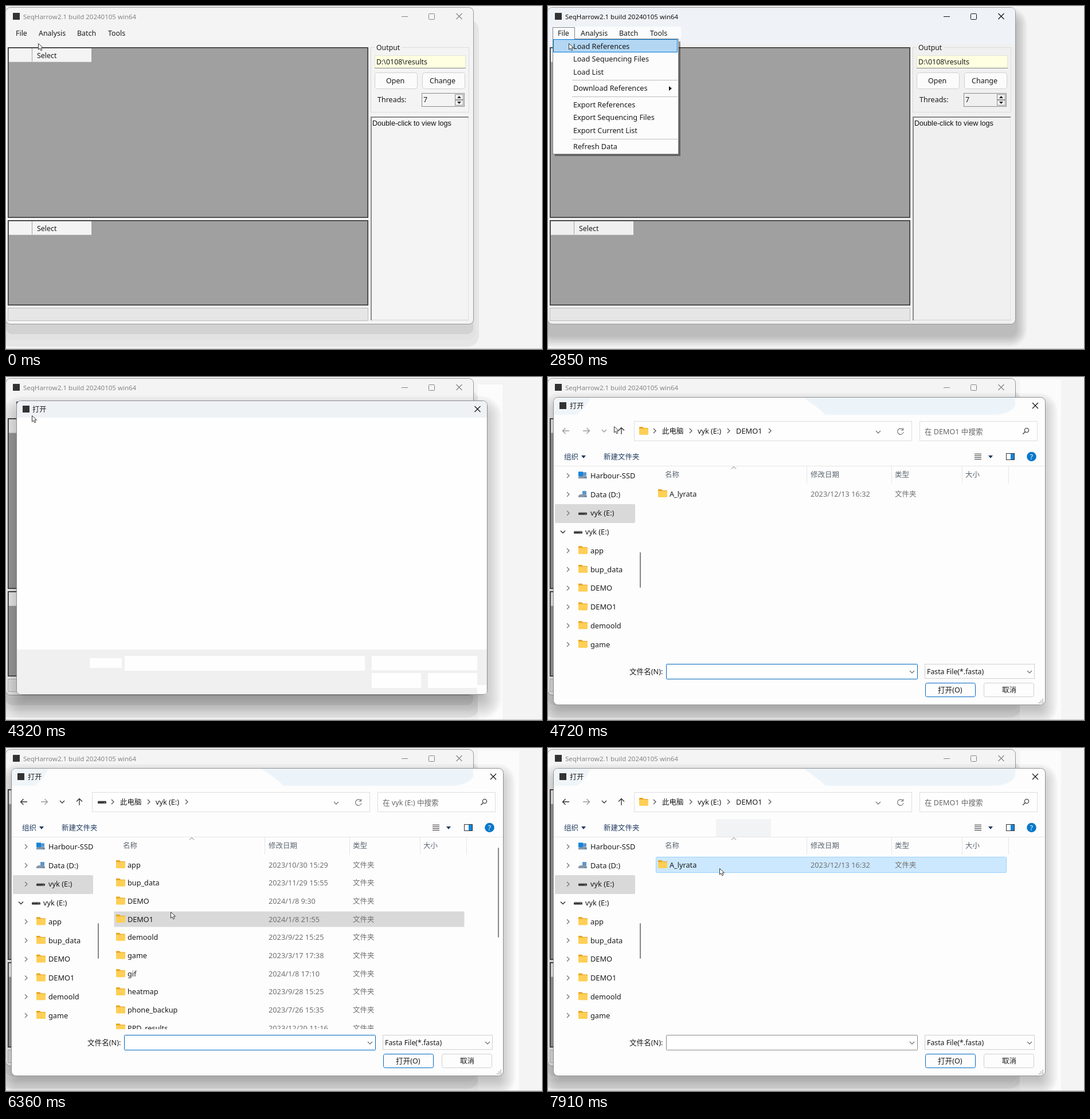
Write an HTML page that moves like this. It is 935x599 px and loops after 8 s.

```html
<!DOCTYPE html>
<html lang="zh">
<head>
<meta charset="utf-8">
<style>
  html, body { margin: 0; width: 100%; height: 100%; overflow: hidden; background: #f4f4f4; }
  svg { display: block; width: 935px; height: 599px; }
  text { font-family: "Noto Sans", "Noto Sans CJK SC", "Noto Sans CJK", sans-serif; white-space: pre; }
  .log { font-family: "Liberation Sans", Arial, sans-serif; }
</style>
</head>
<body>
<svg id="stage" viewBox="0 0 935 599">
  <defs>
    <clipPath id="listClip"><rect x="180" y="156" width="690" height="335"/></clipPath>
    <clipPath id="sideClip"><rect x="10" y="156" width="142" height="334"/></clipPath>
  </defs>
  <g id="scene"></g>
</svg>
<script>
const LOOP = 8000;
const APP = "SeqHarrow2.1 build 20240105 win64";
const DRIVE = "vyk (E:)";
const INK = "#1a1a1a", BLUE = "#0067c0";

// Drawing helpers; strokes sit on half pixels.
const rect = (x, y, w, h, fill, stroke, r = 0) => {
  const o = stroke ? 0.5 : 0;
  return `<rect x="${x + o}" y="${y + o}" width="${w - 2 * o}" height="${h - 2 * o}" rx="${r}" fill="${fill}"` +
    (stroke ? ` stroke="${stroke}"` : "") + "/>";
};
const path = (d, stroke, width = 1, fill = "none") =>
  `<path d="${d}" fill="${fill}" stroke="${stroke}" stroke-width="${width}"/>`;
const shape = (d, fill) => path(d, "none", 0, fill);
const text = (x, mid, s, size = 12.7, fill = INK, cls = "") =>
  `<text x="${x}" y="${mid + 4.5}" font-size="${size}" fill="${fill}" class="${cls}">${s}</text>`;
const hline = (x1, x2, y, c) => rect(x1, y, x2 - x1, 1, c);
const vline = (x, y1, y2, c) => rect(x, y1, 1, y2 - y1, c);
const CHEVRON = { r: "-2,-4l4,4l-4,4", d: "-4,-2l4,4l4,-4", u: "-4,2l4,-4l4,4" };
const chevron = (x, y, dir, c = "#555", w = 1.3) =>
  `<g transform="translate(${x} ${y})">${path("M" + CHEVRON[dir], c, w)}</g>`;
const cross = (x, y, c) => path(`M${x - 5},${y - 5}l10,10m0,-10l-10,10`, c, 1.2);

// Shadows are stacked flat bands: [spread, drop, opacity].
const shadow = (x, y, w, h, bands) => bands.map(([s, dy, a]) =>
  `<rect x="${x - s}" y="${y - s + dy}" width="${w + 2 * s}" height="${h + 2 * s}" rx="${Math.max(8, s + 10)}" opacity="${a}"/>`).join("");
const bands = (n, min, max, dy, a) =>
  Array.from({ length: n }, (_, i) => [min + (max - min) * i / (n - 1), dy, a]);

const folder = (x, y) =>
  shape(`M${x},${y - 6}q0,-1 1,-1h5l2,2h7q1,0 1,1v8h-16z`, "#e9a422") +
  rect(x, y - 4, 16, 11, "#ffcf56", null, 1.5);
const disk = (x, y) =>
  rect(x, y - 1, 15, 4, "#3c3c3c", null, 1) + rect(x + 1, y - 2, 13, 1, "#b0b0b0") + rect(x + 11, y + 1, 2, 1, "#4fd06a");
const dataDisk = (x, y) =>
  shape(`M${x},${y + 2}l3,-2h10l2,2v3h-15z`, "#8798a8") + rect(x + 7, y - 6, 7, 6, "#5d97cc") + rect(x + 11, y + 3, 2, 1, "#2b6cb0");
const cursor = ([x, y]) =>
  path(`M${x + .5},${y + .5}v10.6l2.5,-2.3l1.8,4l2,-.9l-1.8,-3.9h3.5z`, "#333", 1, "#fff");

function mainWindow(s) {
  const on = s.active, face = on ? "#f0f0f0" : "#f4f4f4", ink = on ? "#111" : "#858585";
  const soft = [[10, 30, .06], [4, 24, .02], [0, 18, .07]];
  let g = shadow(0, 3, 815, 552, s.deep ? bands(6, 3, 20, 20, .042) : soft);
  g += rect(-1, 2, 817, 554, face, "#969696", 8);
  if (on) g += shape("M0,66V11q0,-8 8,-8h799q8,0 8,8v55z", "#eff3f8");
  g += rect(12, 12, 12, 12, "#333") + text(30, 18, APP, 11.5, ink);
  g += hline(690, 701, 18, ink) + rect(737, 13, 11, 11, "none", ink, 1) + cross(790.5, 18, ink);

  if (s.menu) g += rect(8, 36, 224, 22, "#fbfcfd");
  if (s.hot === "File") g += rect(8, 37, 39, 21, "#b3d7f3", "#0078d7");
  if (s.hot === "Analysis") g += rect(47, 37, 66, 21, "#b3d7f3", "#0078d7");

  // two tables, then the progress strip
  for (const [y, h] of [[72, 298], [374, 149]]) {
    g += rect(3, y, 629, h, "#a0a0a0", "#2d2d2d") + rect(4, y + 1, 627, h - 2, "none", "#686868");
    g += rect(5, y + 2, 144, 24, face) + vline(45, y + 2, y + 26, "#a0a0a0") + hline(5, 149, y + 25, "#d8d8d8");
    g += text(54, y + 14, "Select", 12.4);
  }
  g += rect(3, 527, 629, 23, "#e6e6e6", "#bcbcbc");

  g += rect(636, 72, 172, 114, "none", "#dcdcdc") + rect(643, 68, 47, 10, face) + text(646, 72, "Output", 12.3);
  g += rect(643, 86, 159, 23, "#ffffe1", "#e2e2d8") + hline(643, 802, 108, "#868686") + text(646, 97.5, "D:\\0108\\results", 12.4);
  g += rect(643, 116, 75, 29, "#fbfbfb", "#d0d0d0", 4) + text(663, 130.5, "Open", 12.5);
  g += rect(726, 116, 75, 29, "#fbfbfb", "#d0d0d0", 4) + text(739, 130.5, "Change", 12.5);
  g += text(648, 163, "Threads:", 12.5) + rect(725, 152, 75, 24, face, "#8a8a8a") + text(728, 163, "7", 12.4);
  g += rect(783, 154, 15, 10, "#f0f0f0", "#8d8d8d") + rect(783, 164, 15, 10, "#f0f0f0", "#8d8d8d");
  g += shape("M787,161h7l-3.5,-4z", "#222") + shape("M787,167h7l-3.5,4z", "#222");

  g += rect(636, 193, 171, 356, face, "#e2e2e2") + rect(636, 193, 171, 2, "#8a8a8a") + rect(636, 193, 2, 356, "#8a8a8a");
  g += hline(638, 807, 548, "#d0d0d0") + text(639, 204, "Double-click to view logs", 12.6, "#111", "log");
  if (s.menu) g += fileMenu(s.pick);
  [["File", 17], ["Analysis", 57], ["Batch", 124], ["Tools", 178]].forEach(([w, x]) => g += text(x, 47, w, 12.4));
  return g;
}

function fileMenu(pick) {
  let g = `<rect x="12" y="62" width="219" height="200" opacity=".38"/>`;
  g += rect(8, 57, 220, 202, "#fcfcfc", "#858585") + rect(8, 37, 39, 21, "#fafbfc", "#858585") + rect(9, 56, 37, 3, "#fbfbfc");
  if (pick) g += rect(9, 58, 217, 23, "#b3d7f3", "#0078d7");
  [["Load References", 70], ["Load Sequencing Files", 92.5], ["Load List", 115], ["Download References", 143.5],
   ["Export References", 172], ["Export Sequencing Files", 194.5], ["Export Current List", 217], ["Refresh Data", 245.5]]
    .forEach(([w, y]) => g += text(44, y, w));
  for (const y of [129, 158, 232]) g += hline(42, 226, y, "#bdbdbd");
  return g + shape("M211,140v8l5,-4z", "#111");
}

function blankDialog() {
  let g = rect(823, 13, 43, 586, "#fcfcfc") + shadow(19, 42, 820, 512, bands(14, -14, 26, 17, .022));
  g += rect(18, 41, 822, 514, "#fefefe", "#8c8c8c", 8);
  g += shape("M19,71V50q0,-8 8,-8h804q8,0 8,8v21z", "#eff2f5");
  g += shape("M19,476H839v70q0,8 -8,8H27q-8,0 -8,-8z", "#f0f0f0");
  g += rect(29, 50, 12, 12, "#333") + text(46, 56.5, "打开", 12.2) + cross(822.5, 56, "#111");
  for (const [x, y, w, h] of [[146, 491, 56, 17], [207, 487, 419, 26], [638, 487, 184, 25],
    [638, 517, 86, 26], [736, 517, 86, 26], [822, 538, 16, 15]]) g += rect(x, y, w, h, "#fefefe");
  return g;
}

const FOLDERS = [["app", "2023/10/30 15:29"], ["bup_data", "2023/11/29 15:55"], ["DEMO", "2024/1/8 9:30"],
  ["DEMO1", "2024/1/8 21:55"], ["demoold", "2023/9/22 15:25"], ["game", "2023/3/17 17:38"], ["gif", "2024/1/8 17:10"],
  ["heatmap", "2023/9/28 15:25"], ["phone_backup", "2023/7/26 15:35"], ["PPD_results", "2023/12/20 11:16"]];
const INNER = [["A_lyrata", "2023/12/13 16:32"]];
const TONES = { gray: ["#d9d9d9"], hover: ["#e5f3ff"], chosen: ["#cce8ff", "#99d1ff"] };

function fileList(s) {
  if (s.list === "none") return "";
  if (s.list === "busy") return text(491, 208, "正在处理...", 12.5, "#6d6d6d");
  let g = "";
  (s.list === "root" ? FOLDERS : INNER).forEach(([name, date], i) => {
    const y = 204 + i * 31.7, tone = s.rows[name];
    if (tone) g += rect(188, Math.round(y) - 14, 612, 28, ...TONES[tone], 1);
    g += folder(192, y - 1) + text(212, y, name) + text(458, y, date, 12.75, "#707070") + text(605, y, "文件夹", 12.5, "#707070");
  });
  return `<g clip-path="url(#listClip)">${g}</g>`;
}

function sidebar() {
  const names = ["Harbour-SSD", "Data (D:)", DRIVE, DRIVE, ...FOLDERS.slice(0, 6).map(f => f[0])];
  let g = rect(12, 222, 140, 33, "#d9d9d9", null, 2);
  names.forEach((name, i) => {
    const y = 172.3 + i * 32.75, open = i === 3;
    g += open ? chevron(26, y, "d", "#333", 1.5) : chevron(35, y, "r", "#777");
    if (i === 0) g += dataDisk(53, y) + rect(53, y - 7, 8, 8, "#1684d8");
    else if (i === 1) g += dataDisk(53, y);
    else if (i < 4) g += disk(open ? 45 : 53, y);
    else g += folder(53, y - 1);
    g += text(open ? 65 : 74, y, name, 12.8);
  });
  return `<g clip-path="url(#sideClip)">${g}</g>` + rect(160, 306, 2, 62, "#858585", null, 1);
}

function addressBar(s) {
  const root = s.place === "root";
  let g = rect(150, 77, 485, 35, "#fefefe", "#dedede") + rect(648, 77, 206, 35, "#fefefe", "#dedede");
  g += root ? disk(160, 94) : folder(159, 94);
  if (s.crumb) {
    const [fill, edge] = s.crumb === 2 ? ["#cce8ff", "#99d1ff"] : ["#e5f3ff", "#cce8ff"];
    g += rect(258, 77, 66, 34, fill, edge) + vline(307, 78, 110, edge);
  }
  const push = s.crumb === 2 ? 1 : 0;
  g += chevron(186, 94, "r") + text(199, 94, "此电脑", 12.5) + chevron(249, 94, "r");
  g += text(261 + push, 94 + push, DRIVE) + chevron(315, 94, s.crumb ? "d" : "r");
  if (!root) g += text(328, 94, "DEMO1", 12.9) + chevron(387, 94, "r");
  g += chevron(576, 96, "d", "#777") + path("M619,92a5.2,5.2 0 1 0 1,4m-.5,-7v4h-4", "#777", 1.2);
  g += text(657, 95, `在 ${root ? DRIVE : "DEMO1"} 中搜索`, 12.6, "#666");
  g += `<circle cx="835" cy="93" r="3.6" fill="none" stroke="#444" stroke-width="1.3"/>` + path("M832.3,95.7l-4,4", "#444", 1.5);
  const back = s.back ? "#333" : "#9a9a9a";
  g += path("M37,94H25.5m5,-5l-5,5l5,5", back, 1.3) + path("M61,94h11.5m-5,-5l5,5l-5,5", "#999", 1.3);
  return g + chevron(98, 94, "d", back) + path("M128,100V88.5m-5,5l5,-5l5,5", "#333", 1.3);
}

function dialog(s) {
  let g = rect(823, 5, 72, 594, "#fbfbfb") + shadow(10, 35, 857, 537, bands(10, -8, 21, 14, .027));
  g += rect(9, 35, 859, 538, "#fdfdfd", "#8f8f8f", 8);
  g += shape("M10,66V44q0,-8 8,-8h56q-6,17 -24,30z", "#eff5f9") + shape("M445,36h370v14q-8,14 -34,16H484q-14,-14 -39,-30z", "#edf4f9");
  g += rect(20, 44, 12, 12, "#333") + text(38, 50.5, "打开", 12.2) + cross(850, 50, "#111");
  if (!s.filled) return g;

  g += addressBar(s);
  g += text(28, 139.5, "组织", 12.5, "#1f3a5f") + shape("M58,137h8l-4,5z", "#1f3a5f") + text(97, 139.5, "新建文件夹", 12.5, "#1f3a5f");
  if (s.patch) g += rect(293, 124, 96, 31, "#f2f3f4");
  for (const y of [134, 137, 140, 143]) g += hline(744, 756, y, "#333");
  g += shape("M768,137h8l-4,5z", "#1f3a5f") + rect(799, 133, 15, 12, "#fff", "#333") + rect(807, 134, 6, 10, "#1684d8");
  g += `<circle cx="843.5" cy="139" r="8.3" fill="#0878c9"/>` + text(840.7, 139, "?", 12, "#fff");

  g += hline(10, 867, 155, "#e6e6e6") + sidebar();
  for (const x of [451, 599, 722, 803]) g += vline(x, 156, 186, "#e6e6e6");
  g += chevron(324, 158.5, "u", "#777", 1);
  [["名称", 204], ["修改日期", 458], ["类型", 605], ["大小", 728]].forEach(([w, x]) => g += text(x, 170, w, 12.5, "#5b6470"));
  g += fileList(s);
  if (s.scroll) g += rect(858, 174, 2, 157, "#858585", null, 1);

  g += text(142, 514.5, "文件名(N):", 12.6) + rect(206, 501, 439, 27, "#fff", s.focus ? BLUE : "#8a8a8a", 1);
  if (s.caret) g += vline(210, 506, 524, "#111");
  g += chevron(635, 515, "d", "#666", 1.1) + rect(657, 501, 192, 26, "#fdfdfd", "#cfcfcf") + text(661, 514.5, "Fasta File(*.fasta)", 12.3);
  g += chevron(840, 515, "d", "#666", 1.1);
  g += rect(658, 534, 88, 25, "#fdfdfd", BLUE, 3) + text(680, 546.5, "打开(O)", 12.6);
  g += rect(760, 534, 88, 25, "#fdfdfd", "#cfcfcf", 3) + text(792, 546.5, "取消", 12.5);
  for (let i = 0; i < 3; i++) for (let j = 0; j <= i; j++) g += rect(862 - 3 * j, 562 + 3 * i, 2, 2, "#b5b5b5");
  return g;
}

// Each step changes part of the state and holds until the next.
const STEPS = [
  [0, { cur: [56, 65], rows: {}, place: "sub", list: "none" }],
  [130, { cur: [55, 58], hot: "Analysis" }],
  [250, { cur: [50, 53] }],
  [370, { cur: [41, 50], hot: "File" }],
  [490, { cur: [34, 49] }],
  [1100, { active: true }],
  [1220, { deep: true }],
  [2160, { menu: true, hot: "" }],
  [2580, { cur: [35, 57] }],
  [2710, { cur: [36, 64], pick: true }],
  [2850, { cur: [36, 65] }],
  [3680, { menu: false }],
  [3800, { active: false, deep: false }],
  [4320, { cur: [45, 67], dlg: "blank" }],
  [4440, { dlg: "full" }],
  [4590, { cur: [70, 76], filled: true, focus: true }],
  [4710, { cur: [115, 86], list: "sub" }],
  [4830, { cur: [160, 91], caret: true }],
  [4960, { cur: [195, 93], caret: false }],
  [5110, { cur: [240, 93] }],
  [5230, { cur: [277, 94], crumb: 1 }],
  [5470, { crumb: 2, caret: true }],
  [5610, { list: "busy", scroll: true }],
  [5730, { crumb: 1, place: "root" }],
  [5860, { cur: [280, 130], crumb: 0, back: true, list: "root", rows: { DEMO1: "gray" } }],
  [5980, { cur: [283, 182], caret: false }],
  [6100, { cur: [285, 228], rows: { DEMO1: "gray", bup_data: "hover" } }],
  [6220, { cur: [287, 262], rows: { DEMO1: "gray", DEMO: "hover" } }],
  [6360, { cur: [287, 286], rows: { DEMO1: "gray" } }],
  [6490, { rows: { DEMO1: "chosen" }, caret: true }],
  [6790, { focus: false, caret: false }],
  [6910, { place: "sub", list: "busy", rows: {} }],
  [7040, { cur: [293, 252], list: "sub", scroll: false }],
  [7190, { cur: [299, 223], patch: true }],
  [7350, { cur: [297, 208], rows: { A_lyrata: "hover" } }],
  [7500, { cur: [294, 205] }],
  [7620, { cur: [298, 209] }],
  [7770, { rows: { A_lyrata: "chosen" } }],
  [7910, { cur: [299, 210] }],
];

let state = {};
const frames = STEPS.map(([at, change]) => {
  state = { ...state, ...change };
  const top = state.dlg === "blank" ? blankDialog() : state.dlg === "full" ? dialog(state) : "";
  return { at, svg: mainWindow(state) + top + hline(0, 935, 598, "#c4c4c4") + cursor(state.cur) };
});

const scene = document.getElementById("scene");
const start = performance.now();
let shown = -1;
function draw(now) {
  const t = Math.max(0, now - start) % LOOP;
  const i = frames.findLastIndex(f => f.at <= t);
  if (i !== shown) scene.innerHTML = frames[shown = i].svg;
  requestAnimationFrame(draw);
}
draw(start);
</script>
</body>
</html>
```
